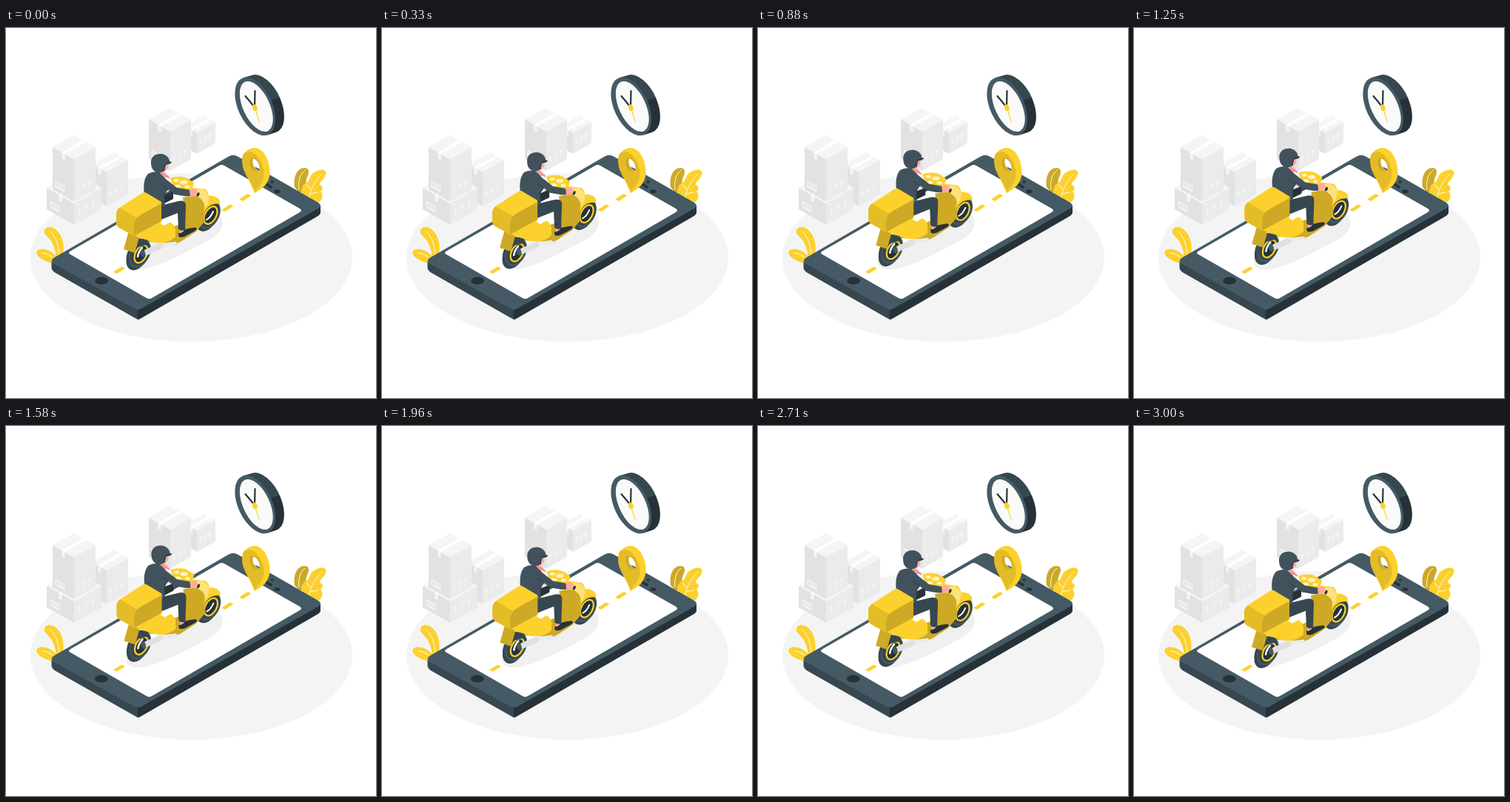
Animation, 500 px wide and 500 px high, one loop 3.04 s. Source, as an HTML page:

```html
<!DOCTYPE html>
<html lang="en">
<head>
<meta charset="utf-8">
<title>Delivery scooter</title>
<style>
  html, body { margin: 0; width: 100%; height: 100%; overflow: hidden; background: #fff; }
  svg { display: block; width: 100vw; height: 100vh; }
  .sun { fill: #fcd12d; }
  .amber { fill: #e3bc28; }
  .gold { fill: #cda925; }
  .slate { fill: #455a64; }
  .suit { fill: #42525c; }
  .steel { fill: #37474f; }
  .ink { fill: #263238; }
  .skin { fill: #ffa8a7; }
  .white { fill: #fff; }
  .line { fill: none; stroke-linecap: round; stroke-linejoin: round; }
</style>
</head>
<body>
<svg viewBox="0 0 500 500" xmlns="http://www.w3.org/2000/svg">
  <defs>
    <linearGradient id="rim" gradientUnits="userSpaceOnUse" x1="363.500" y1="90.500" x2="367.500" y2="99.500">
      <stop offset=".5" stop-color="#37474f"/>
      <stop offset=".5" stop-color="#263238"/>
    </linearGradient>
    <g id="wheel">
      <ellipse class="steel" cx="-5" cy="-1.500" rx="20" ry="13" transform="rotate(-62)"/>
      <ellipse class="steel" cx="-2" cy="-3" rx="20" ry="13" transform="rotate(-62)"/>
      <ellipse class="slate" rx="20" ry="13" transform="rotate(-62)"/>
      <ellipse class="steel" cx="1" rx="18.500" ry="11.800" transform="rotate(-62)"/>
      <ellipse class="ink" rx="12.800" ry="7.600" transform="translate(1.500 .5) rotate(-62)" stroke="#fcd12d" stroke-width="2.200"/>
    </g>
  </defs>
  <rect width="500" height="500" fill="#fff"/>
  <ellipse cx="250.500" cy="310" rx="217.500" ry="114" fill="#f4f4f4"/>
  <g id="crates"></g>

  <g id="leftPlant">
    <path class="sun" d="M52 276C51 268 62 266 69 274C78 283 78 295 77.500 306L68 311C67 297 62 288 56 282C53 279 52 278 52 276Z"/>
    <path class="sun" d="M41 303C43 297 55 298 62 303L70 310L63 318C54 316 42 311 41 303Z"/>
    <path class="line" stroke="#fff" stroke-width=".9" d="M60 275C68 283 71 293 71.500 305M49 304Q58 305 64 311"/>
  </g>
  <g id="rightPlant">
    <path class="gold" d="M390 215C388 201 393 190 403 189C411 189 410 196 406 204L403 222L396 222Z"/>
    <path class="line" stroke="#fff" stroke-width=".9" d="M404 192C396 199 395 208 396 218"/>
    <path class="sun" d="M399 222C399 213 403 210 408 208C411 203 411 198 418 194C426 190 433 191 432.500 196C432 204 423 207 424 212C429 213 429 218 425 221C429 224 428 231 424 235L411 235Z"/>
    <path class="line" stroke="#fff" stroke-width=".9" d="M427 197C417 207 411 219 409 231M411 218L407 212M411 224L421 222"/>
  </g>

  <g id="phone">
    <path class="steel" d="M61.500 316V324Q62 328 67 331L178 394V380Z"/>
    <path class="ink" d="M178 380L425 240V250Q424 253 420 255L183 392Q180 394 178 394Z"/>
    <path class="slate" d="M64 311L301 173.500Q307 170 313 173.500L422 236Q428 240 422 244L183 379Q178 382 173 379L65 319Q59 315 64 311Z"/>
    <path class="white" d="M87 301.500L288 186Q291.500 184 295 186L397 244Q401 246.500 397 249L197 365Q193.500 367 190 365L87 306Q83 304 87 301.500Z"/>
    <g class="ink">
      <ellipse cx="129" cy="341.500" rx="9" ry="5"/>
      <ellipse cx="360" cy="208" rx="2.200" ry="1.500"/>
      <ellipse cx="366.500" cy="220.700" rx="4" ry="2.500"/>
    </g>
    <path class="line" stroke="#263238" stroke-width="3.600" d="M350 210L358 215"/>
    <path class="sun" d="M145 329.500L156.500 322.500L161 325L149.500 332ZM291 246L302.500 238.500L307.500 240.500L296 248ZM315 231.500L326.500 224L331.500 226.500L320 234Z"/>
    <path fill="#f0f0f0" d="M162 316C162 327 178 328 191 325C216 318 250 300 275 286C290 278 295 268 292 258C289 248 277 248 270 253L172 303Z"/>
  </g>

  <g id="pin">
    <path class="sun" d="M320 171C326 164 333 160 341 163C351 168 357 182 356.500 196C356 210 347 217 336 223L325 199Z"/>
    <path class="amber" d="M319 179C319 167 328 164 336 170C345 177 350 190 348 202C346 211 340 215 336 223C334 211 327 205 323 196C320 190 319 185 319 179Z"/>
    <ellipse class="gold" rx="10" ry="6.500" transform="translate(336.500 184.500) rotate(62)"/>
    <path class="white" d="M334 176.500C332 184 335 190 342.500 192.500C344 186 340 178 334 176.500Z"/>
    <path class="slate" d="M336 187.500L342.700 190.500L342.500 192.500Q338 191 336 187.500Z"/>
  </g>

  <g id="clock">
    <path fill="url(#rim)" d="M320.600 67.300L332.500 63.700A42 23 65 0 1 364.700 141.100L352.800 144.700Z"/>
    <ellipse class="slate" rx="42" ry="23" transform="translate(336.700 106) rotate(65)"/>
    <ellipse fill="#fafafa" rx="36.600" ry="18" transform="translate(338.300 106) rotate(65)"/>
    <path class="line" stroke="#263238" stroke-width="2.200" d="M336 107L323.500 92M336 107L336.500 85"/>
    <path class="line" stroke="#fcd12d" stroke-width="1.100" d="M336 107L342 126"/>
    <ellipse class="sun" cx="336.300" cy="107.700" rx="3.200" ry="4.600" transform="rotate(-18 336.300 107.700)"/>
  </g>

  <g id="rider">
    <use href="#wheel" x="275" y="252.500"/>
    <path class="line" stroke="#fff" stroke-width="2" d="M271 259Q276 257 280 248"/>
    <path class="sun" d="M259 244C261 233 270 225 280 227C288 229 290 234 289 238C279 236 271 241 267 252L259 256Z"/>

    <path class="steel" d="M176 284L194 286L192 300L172 303Z"/>
    <use href="#wheel" x="181" y="305"/>
    <path class="line" stroke="#fff" stroke-width="2.500" d="M178 309Q179 302 184 297"/>
    <path class="steel" d="M177 284L194 286L190 293L176 297Z"/>
    <path class="gold" d="M166 274L180 283L174 304L159 299Z"/>
    <path class="gold" d="M192 286L222 270L243 262L269 248L268 262L257 275L231 292Q210 290 192 289Z"/>
    <path class="line" stroke="#ebebeb" stroke-width="5" d="M206 294L232 291"/>
    <path class="line" stroke="#e0e0e0" stroke-width="8" d="M190 303L208 295"/>
    <ellipse class="slate" cx="185" cy="304.500" rx="3.300" ry="5.200" transform="rotate(-15 185 304.500)"/>
    <path class="sun" d="M173 280L212 260Q227 261 229 272V282C220 291 206 293 192 287Q181 284 173 280Z"/>
    <path class="gold" d="M229 273V288L231 291L243 284V263Z"/>
    <path class="white" d="M207 263L232 249L234 255L214 267Z"/>

    <path class="sun" d="M222 203Q231 199 243 202L254 209L252 216L270 218Q276 224 274 236L270 244L245 226L228 219Z"/>
    <g fill="#fff3c4">
      <ellipse cx="230" cy="206" rx="3.500" ry="2"/>
      <ellipse cx="240" cy="208.500" rx="5" ry="2.800"/>
      <ellipse cx="245" cy="214.500" rx="3.500" ry="2"/>
      <ellipse cx="232" cy="214" rx="4" ry="2.300"/>
    </g>
    <path class="gold" d="M239 229Q253 226 267 228Q270 246 264 258L243 271Z"/>
    <path fill="#fde17a" d="M256 219Q270 215 274 228Q275 237 269 243Q268 231 256 227Z"/>
    <ellipse class="ink" cx="259.500" cy="225" rx="1.700" ry="3" transform="rotate(25 259.500 225)"/>

    <path class="ink" d="M213 226L226 221V231L212 238Z"/>
    <path class="skin" d="M208 192L215 195L220 201L211 203L204 199Z"/>
    <path class="skin" d="M212 182L218 184L219 188Q218 193 214 193L207 193Z"/>
    <path class="suit" d="M187 224C185 213 187 202 192 197Q199 193 207 195L215 203L222 214L215 224L214 239H208Z"/>
    <path class="line" stroke="#f28f8f" stroke-width="2.200" d="M211 197L220 202"/>
    <path class="line" stroke="#42525c" stroke-width="9" d="M211 206L229 220L246 223"/>
    <path class="line" stroke="#263238" stroke-width=".7" d="M210 212L226 224L243 227M214 238V223"/>
    <path class="skin" d="M248 219L255 217L259 221L256 226L249 228Z"/>
    <path class="suit" d="M196 183C195 174 202 169.500 210 170C217 171 221 176 221 180L224 181.500Q222 184 216 185L214 193Q207 198 200 193Q196 189 196 183Z"/>
    <path class="line" stroke="#263238" d="M216 183L223 181.700M215 185Q213 190 214 193"/>

    <path class="skin" d="M234 270L242 272L241 278L235 280Z"/>
    <path class="ink" d="M233 277Q237 279 242 272Q249 270 256 269.500Q260 272 254 275L241 282Q234 284 233 281Z"/>
    <path class="steel" d="M208 240L233 234Q243 232 243 240L242 273Q237 275 233 272L232 250L207 260Z"/>

    <path class="sun" d="M149 250Q150 244 156 241L184 223Q187 221 190 223L210 235L209 264L173 281L153 270Q149 268 149 262Z"/>
    <path class="amber" d="M149 251Q150 245 154 243L176 256Q172 262 173 281L153 270Q149 268 149 262Z"/>
    <path class="gold" d="M173 281Q171 262 177 256Q180 253 210 237V261Z"/>
  </g>
</svg>
<script>
const LOOP = 3040;
const LIFT = 8.9;
const byId = id => document.getElementById(id);
const poly = (fill, ...pts) => `<polygon fill="${fill}" points="${pts.join(' ')}"/>`;

// Isometric crate: near top corner (x, y), face widths l and r, height h.
function crate(x, y, l, r, h) {
  const k = 0.567;
  const left = [x - l, y - l * k], right = [x + r, y - r * k];
  const back = [x + r - l, y - (l + r) * k];
  const arrow = along => `M${x + r * along} ${y + h - 16 - r * along * k}v7m-2 -4l2 -4l2 2`;
  const tx = x - l / 2, ty = y - l * k / 2;
  const lx = x - l * .85, ly = y + h - 13 - l * k * .85;
  return poly('#f5f5f5', [x, y], left, back, right)
    + poly('#e2e2e2', [x, y], left, [x - l, y - l * k + h], [x, y + h])
    + poly('#ebebeb', [x, y], right, [x + r, y - r * k + h], [x, y + h])
    + poly('#fff', [tx - 2, ty - 1], [tx + 2, ty + 1], [tx + r + 2, ty + 1 - r * k], [tx + r - 2, ty - 1 - r * k])
    + poly('#f5f5f5', [tx - 2, ty - 1], [tx + 2, ty + 1], [tx + 2, ty + 9], [tx - 2, ty + 7])
    + `<path class="line" stroke="#f8f8f8" d="${[.2, .45, .7].map(arrow).join('')}"/>`
    + (l > 20 ? `<path class="line" stroke="#f8f8f8" stroke-width="1.2" d="M${lx} ${ly}l11 6v7l-11 -6zm4 3v6m3 -4v6"/>` : '');
}

byId('crates').innerHTML = [
  [258, 142, 16, 25, 28],
  [222, 140, 29, 28, 53],
  [136, 195, 19, 29, 46],
  [92, 237, 37, 37, 29],
  [92, 177.5, 29, 29, 57]
].map(c => crate(...c)).join('');

const rider = byId('rider');

// The scooter floats up and back down at a steady pace.
function draw(now) {
  const rise = 1 - Math.abs(1 - 2 * (now % LOOP) / LOOP);
  rider.setAttribute('transform', `translate(${rise * .5} ${-rise * LIFT})`);
  requestAnimationFrame(draw);
}
draw(0);
</script>
</body>
</html>
```
